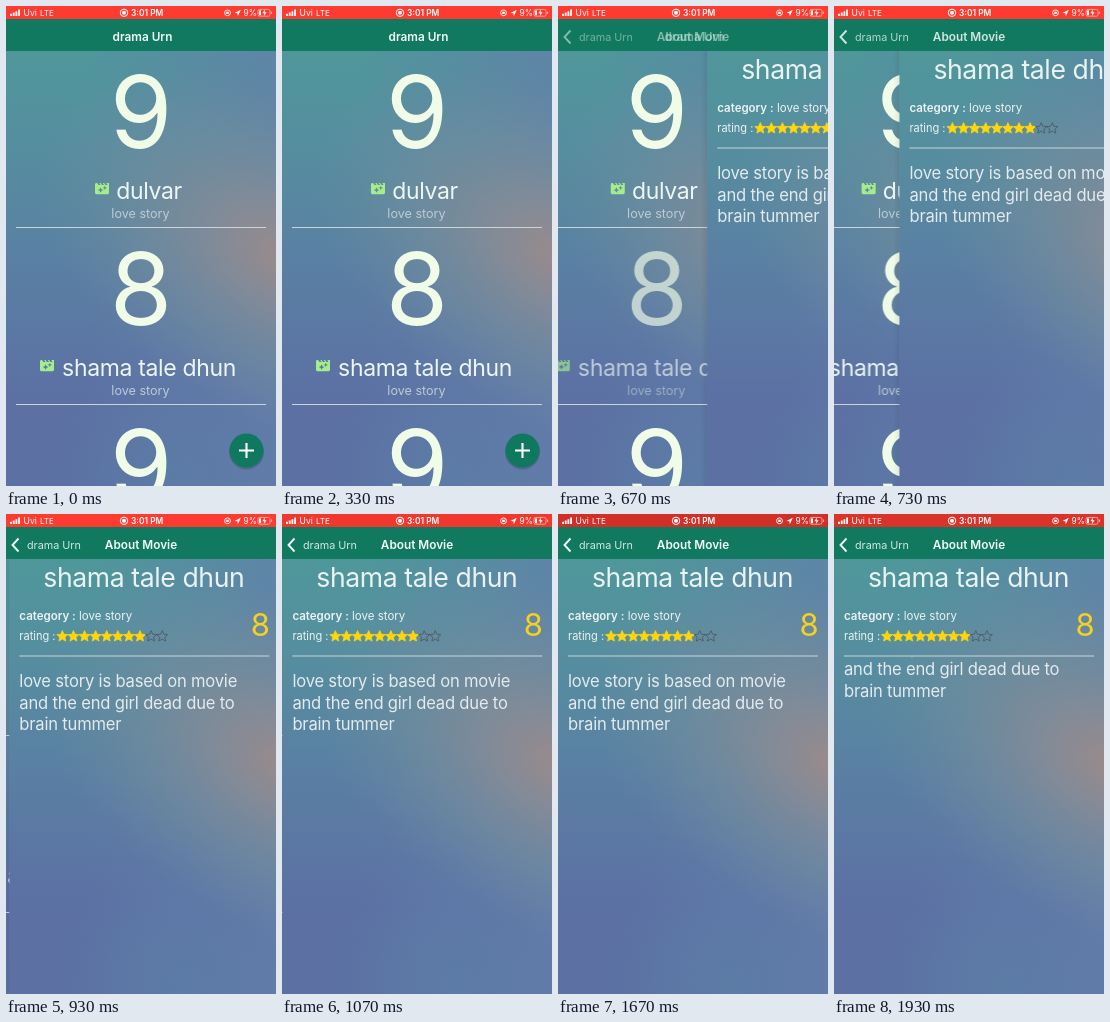
Write an HTML page that moves like this. It is 270 px wide and 480 px high and loops after 1990 ms.

```html
<!DOCTYPE html>
<html lang="en">
<head>
<meta charset="utf-8">
<title>Movie list</title>
<style>
  html, body { margin: 0; width: 100%; height: 100%; overflow: hidden; background: #5b78a4; }
  svg { display: block; width: 100vw; height: 100vh; font-family: Inter, Roboto, sans-serif; }
  .mid { text-anchor: middle; }
  .score { font-size: 101px; fill: #f0fce8; }
  .name { font-size: 23px; letter-spacing: -.35px; fill: #edf6f2; }
  .genre { font-size: 12.6px; fill: #bccbd7; }
  .rule { stroke: #c9d5da; stroke-width: 1.2; }
  .heading { font-size: 26.6px; letter-spacing: -.4px; fill: #e9f3f2; }
  .info { font-size: 11.5px; fill: #ecf3f3; }
  .plot { font-size: 16.6px; letter-spacing: -.2px; fill: #e3ebee; }
  .bar { font-size: 11.8px; fill: #f2faf6; }
  .bold { font-weight: 600; }
  .status { font-size: 8.6px; fill: #fff; }
</style>
</head>
<body>
<svg viewBox="0 0 270 480" preserveAspectRatio="none">
  <defs>
    <linearGradient id="sky" x2="0" y2="1">
      <stop offset="0" stop-color="#4f979a"/>
      <stop offset=".2" stop-color="#558f9f"/>
      <stop offset=".5" stop-color="#5a7fa3"/>
      <stop offset=".8" stop-color="#5c70a4"/>
      <stop offset="1" stop-color="#5c70a3"/>
    </linearGradient>
    <linearGradient id="cool">
      <stop offset=".3" stop-color="#647fab" stop-opacity="0"/>
      <stop offset="1" stop-color="#647fab" stop-opacity=".75"/>
    </linearGradient>
    <radialGradient id="warm" gradientUnits="userSpaceOnUse" cx="0" cy="0" r="1"
      gradientTransform="translate(282 252) rotate(28) scale(270 165)">
      <stop offset="0" stop-color="#a08b88" stop-opacity=".95"/>
      <stop offset=".3" stop-color="#8c8e93" stop-opacity=".75"/>
      <stop offset=".65" stop-color="#769099" stop-opacity=".45"/>
      <stop offset="1" stop-color="#6f8ca0" stop-opacity="0"/>
    </radialGradient>
    <radialGradient id="pool" gradientUnits="userSpaceOnUse" cx="165" cy="470" r="120">
      <stop offset="0" stop-color="#5a80a6" stop-opacity=".6"/>
      <stop offset="1" stop-color="#5a80a6" stop-opacity="0"/>
    </radialGradient>
    <linearGradient id="shade">
      <stop offset="0" stop-opacity="0"/>
      <stop offset="1" stop-opacity=".07"/>
    </linearGradient>
    <clipPath id="plotArea"><rect y="143" width="270" height="337"/></clipPath>
    <g id="backdrop">
      <rect y="45" width="270" height="435" fill="url(#sky)"/>
      <rect y="45" width="270" height="435" fill="url(#cool)"/>
      <rect y="45" width="270" height="435" fill="url(#pool)"/>
      <rect y="45" width="270" height="435" fill="url(#warm)"/>
    </g>
    <path id="clapper" fill="#a5ec8b" d="M18 4l2 3h-3l-2-3h-2l2 3h-3l-2-3H8l2 3H7L5 4H4c-1.1 0-2 .9-2 2v12c0 1.1.9 2 2 2h16c1.1 0 2-.9 2-2V4zm-6.75 11.25L10 18l-1.25-2.75L6 14l2.75-1.25L10 10l1.25 2.75L14 14zm5.69-3.31L16 14l-.94-2.06L13 11l2.06-.94L16 8l.94 2.06L19 11z"/>
  </defs>

  <g id="list">
    <use href="#backdrop"/>
    <g id="rows"></g>
    <circle cx="240.5" cy="446" r="17.5" opacity=".16"/>
    <circle cx="240.5" cy="444.5" r="17" fill="#0f785f"/>
    <path d="M233 444.5h15M240.5 437v15" stroke="#fff" stroke-width="2.1"/>
  </g>

  <g id="detail">
    <rect id="edge" x="-6" y="45" width="6" height="435" fill="url(#shade)"/>
    <use href="#backdrop"/>
    <text class="heading mid" x="134.5" y="73">shama tale dhun</text>
    <text class="info" x="10" y="106"><tspan class="bold">category :</tspan> love story</text>
    <text class="info" x="10" y="126" style="font-size:11px">rating :</text>
    <g id="stars"></g>
    <text class="mid" x="251" y="122" font-size="31" fill="#f6d11f">8</text>
    <path class="rule" d="M10 142H260"/>
    <g clip-path="url(#plotArea)">
      <g id="plot" class="plot">
        <text x="10" y="173">love story is based on movie</text>
        <text x="10" y="194.5">and the end girl dead due to</text>
        <text x="10" y="216">brain tummer</text>
      </g>
    </g>
    <rect id="blank" y="45" width="270" height="435" fill="#95928f"/>
  </g>

  <rect y="13" width="270" height="32" fill="#127961"/>
  <text id="listBar" class="bar bold mid" x="136.5" y="35">drama Urn</text>
  <g id="detailBar">
    <path d="M12.5 24.5L6.5 31l6 6.5" fill="none" stroke="#f2faf6" stroke-width="1.9"/>
    <text class="bar" x="21" y="35" style="font-size:10.8px" opacity=".85">drama Urn</text>
    <text class="bar bold mid" x="135" y="35">About Movie</text>
  </g>

  <rect width="270" height="13" fill="#fd3b31"/>
  <rect id="pulse" width="270" height="13"/>
  <g class="status">
    <path d="M5 10V7.8M7.7 10V6.6M10.4 10V5.2M13.1 10V3.6" stroke="#fff" stroke-width="1.8"/>
    <text x="17.5" y="10">Uvi</text>
    <text x="34" y="10" style="font-size:8px">LTE</text>
    <circle cx="118" cy="6.8" r="3.7" fill="none" stroke="#fff"/>
    <circle cx="118" cy="6.8" r="2" fill="#fff"/>
    <text class="bold" x="125" y="10" style="font-size:8.4px">3:01 PM</text>
    <circle cx="221.5" cy="6.8" r="2.9" fill="none" stroke="#fff" stroke-width=".9"/>
    <rect x="220.2" y="5.7" width="2.6" height="2.2" fill="#fff"/>
    <path d="M228.5 7l6.3-3.2-3 6.4-.4-2.9z" fill="#fff"/>
    <text x="237.5" y="10" style="font-size:8.3px">9%</text>
    <rect x="252" y="3.4" width="12" height="6.8" rx="1.8" fill="none" stroke="#ffb9b3" stroke-width=".8"/>
    <path d="M265.6 5.6v2.4" stroke="#ffb9b3"/>
    <rect x="253" y="4.4" width="2" height="4.8" fill="#fff"/>
    <path d="M259 3.4l-2.6 3.8h2l-.6 3 2.8-4h-2z" fill="#fff"/>
  </g>
</svg>
<script>
  const LOOP = 1990, STEPS = 30, WIDTH = 270, ROW_HEIGHT = 177;
  const $ = id => document.getElementById(id);
  const clamp = v => Math.max(0, Math.min(1, v));
  const easeInOut = v => v < .5 ? 2 * v * v : 1 - 2 * (1 - v) ** 2;
  const ramp = (t, start, length) => easeInOut(clamp((t - start) / length));
  const slide = (el, x, y = 0) => el.setAttribute('transform', `translate(${x} ${y})`);
  const fade = (el, opacity) => el.setAttribute('opacity', opacity);

  const movies = [
    { score: 9, name: 'dulvar', iconX: 89 },
    { score: 8, name: 'shama tale dhun', iconX: 34 },
    { score: 9, name: '', iconX: 89 }
  ];
  $('rows').innerHTML = movies.map(({ score, name, iconX }, i) => `
    <g transform="translate(0 ${i * ROW_HEIGHT})">
      <g>
        <text class="score mid" x="135" y="142">${score}</text>
        <use href="#clapper" transform="translate(${iconX - 1.4} 174.2) scale(.7)"/>
        <text class="name mid" x="143" y="192.5">${name}</text>
        <text class="genre mid" x="134.5" y="211.5">love story</text>
      </g>
      <path class="rule" d="M10 221.5H260"/>
    </g>`).join('');
  const pressedRow = $('rows').children[1].firstElementChild;

  const starPoints = cx => Array.from({ length: 10 }, (_, i) => {
    const r = i % 2 ? 2.7 : 5.8, a = i * Math.PI / 5;
    return `${cx + r * Math.sin(a)},${122.4 - r * Math.cos(a)}`;
  }).join(' ');
  $('stars').innerHTML = Array.from({ length: 10 }, (_, i) =>
    `<polygon points="${starPoints(53 + i * 11.1)}" stroke-width=".8" stroke-linejoin="round" ` +
    (i < 8 ? 'fill="#ffd60a" stroke="#ffd60a"/>' : 'fill="none" stroke="#4d5560"/>')).join('');

  // Critically damped spring: share of the push still to travel.
  function pushLeft(t) {
    const u = Math.max(0, t - 581) * .0184;
    return (1 + u) * Math.exp(-u);
  }

  function draw(t) {
    const left = pushLeft(t), done = 1 - left;
    slide($('list'), -.3 * WIDTH * done);
    slide($('detail'), WIDTH * left);
    fade($('edge'), left < 1 ? 1 : 0);
    fade($('blank'), t < 650 ? 1 : 0);
    fade($('listBar'), clamp(1 - 1.3 * done));
    fade($('detailBar'), clamp(1.12 * done));
    fade(pressedRow, 1 - .8 * ramp(t, 400, 150) + .8 * ramp(t, 565, 180));
    fade($('pulse'), .18 * Math.max(0, Math.sin(Math.PI * (t - 930) / 1400)));
    slide($('plot'), 0, -33.5 * ramp(t, 1660, 263));
  }

  let start;
  function tick(now) {
    start ??= now;
    const step = Math.floor((now - start) % LOOP / LOOP * STEPS);
    draw(step * LOOP / STEPS);
    requestAnimationFrame(tick);
  }
  draw(0);
  requestAnimationFrame(tick);
</script>
</body>
</html>
```
